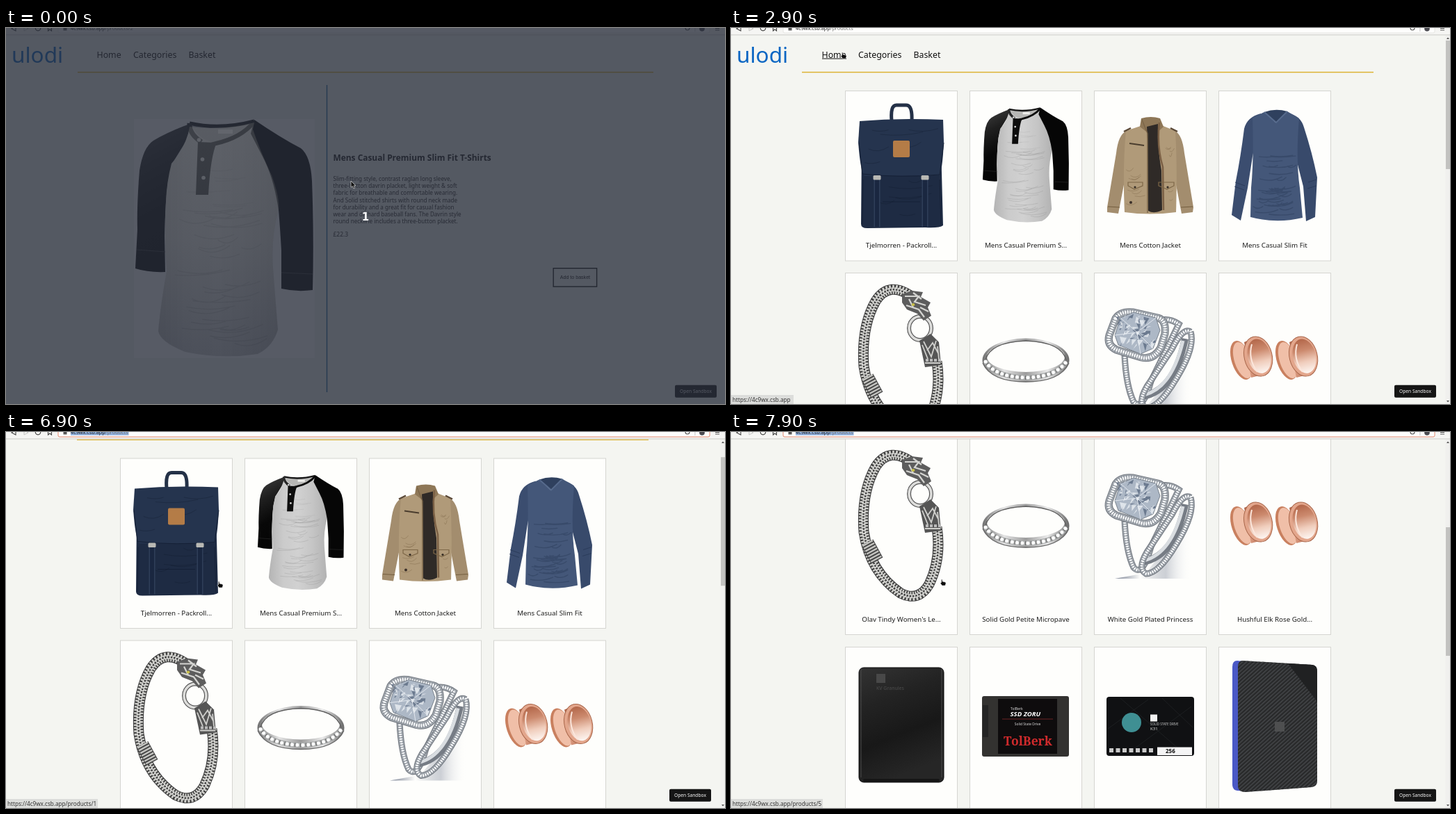
An HTML page for the animation above (8 s loop, 1034x541 px).

```html
<!DOCTYPE html>
<html lang="en">
<head>
<meta charset="utf-8">
<title>Shop demo</title>
<style>
  html, body { margin: 0; width: 100%; height: 100%; overflow: hidden; background: #f4f5f1; }
  svg { display: block; width: 100vw; height: 100vh; font-family: "Noto Sans", sans-serif; }
  text { white-space: pre; }
</style>
</head>
<body>
<svg id="stage" viewBox="0 0 1034 541"></svg>
<script>
const LOOP = 8000, TICK = 100;

let seed = 7;
const random = () => (seed = (seed * 16807) % 2147483647) / 2147483647;

// ---- markup helpers ----
const fill = (d, color, more = '') => `<path d="${d}" fill="${color}" ${more}/>`;
const line = (d, width, color, more = '') =>
  `<path d="${d}" fill="none" stroke="${color}" stroke-width="${width}" ${more}/>`;
const rect = (x, y, w, h, color, more = '') =>
  `<rect x="${x}" y="${y}" width="${w}" height="${h}" fill="${color}" ${more}/>`;
const oval = (x, y, rx, ry, color, more = '') =>
  `<ellipse cx="${x}" cy="${y}" rx="${rx}" ry="${ry}" fill="${color}" ${more}/>`;
const text = (x, y, size, content, color = '#111', more = '') =>
  `<text x="${x}" y="${y}" font-size="${size}" fill="${color}" ${more}>${content}</text>`;
const middle = 'text-anchor="middle"';
const gradient = (id, x2, y2, colors) =>
  `<linearGradient id="${id}" x2="${x2}" y2="${y2}">${colors.map((c, i) =>
    `<stop offset="${i / (colors.length - 1)}" stop-color="${c}"/>`).join('')}</linearGradient>`;

function creases(x, y, w, h, count, color, width = 1) {
  let d = '';
  for (let i = 0; i < count; i++) {
    const len = w * (.2 + .4 * random()), x0 = x + (w - len) * random(), y0 = y + h * random();
    d += `M${x0} ${y0}q${len / 2} ${h * .05 * (random() + .3)} ${len} ${-h * .04 * random()}`;
  }
  return line(d, width, color, 'opacity=".3" stroke-linecap="round"');
}

// small random triangles inside a box
function shards(x, y, w, h, count, color) {
  let d = '';
  for (let i = 0; i < count; i++) {
    d += `M${x + w * random()} ${y + h * random()}l${10 * random()} ${9 * random() - 6}l${-8 * random()} ${10 * random()}Z`;
  }
  return fill(d, color, 'opacity=".7"');
}

const pave = (d, width, gap = 3.4) =>
  line(d, width, '#70767e') + line(d, width - 2, '#a4aab1') +
  line(d, width * .45, '#f3f5f7', `stroke-linecap="round" stroke-dasharray="0 ${gap}"`) +
  line(d, width * .6, '#666d76', `stroke-dasharray=".8 ${gap - .8}" stroke-dashoffset="${gap / 2}"`);

// ---- products ----
const torso = 'M264 142L262 152Q254 178 238 195Q231 222 230 250Q227 300 231 350Q222 400 219 436' +
  'Q222 452 258 466Q310 477 362 469Q384 458 391 434Q387 385 384 345Q381 300 392 262' +
  'Q394 245 382 212Q366 178 355 146L357 136Q310 148 264 142Z';

const raglan = () =>
  fill('M264 138Q232 150 212 162Q197 172 192 205Q188 255 189 290L186 346Q205 352 229 351L228 300Q229 250 233 222L239 195L263 156Z', 'url(#sleeve)') +
  fill(torso, 'url(#heather)') +
  creases(236, 260, 140, 195, 34, '#777', 1.4) +
  creases(250, 190, 110, 70, 7, '#999', 1.2) +
  fill('M357 132Q395 158 424 173Q438 184 440 220Q443 300 441 377Q418 380 396 375L396 320Q394 285 392 262Q385 215 369 185L352 152Z', '#060606') +
  fill('M266 138Q310 150 354 136Q335 158 302 166Q275 160 266 138', '#b7b7b5') +
  rect(305, 146, 21, 6, '#efefec') +
  line('M264 137Q308 147 357 134', 5, '#161616') +
  line('M357 135Q338 158 302 166Q290 168 284 178', 6, '#0a0a0a') +
  line('M264 137Q263 152 281 164', 7, '#262626') +
  fill('M276 164L303 165Q294 185 291 240L273 240Z', '#0d0d0d') +
  [[277.5, 161], [282.5, 189], [284, 215.5]].map(([x, y]) => oval(x, y, 2.8, 2.8, '#d9d9d9')).join('') +
  line('M188 319L229 322M396 352L441 354', .9, '#3a3a3a');

const backpack = () =>
  line('M231 133Q229 111 238 111L252 111Q261 111 260 133', 5, '#243147') +
  fill('M188 170L302 170L305 284Q300 288 280 287L196 288Q187 288 187 282Z', '#1e2b43') +
  fill('M185 134Q245 129 305 132L306 164Q304 208 299 212L192 213Q186 206 183 164Z', '#25344e') +
  line('M184 165L189 210Q245 216 300 211L306 165', 1, '#152036') +
  line('M190 218L189 283M300 218L302 283M218 250H272', 1, '#152036') +
  creases(192, 136, 106, 140, 12, '#0f1828') +
  rect(233, 162, 24, 24, '#b47c47', 'rx="2"') +
  line('M210 216V286M279 216V286', 9, '#2f3f59') +
  line('M210 216V286M279 216V286', 6, '#1a2740') +
  rect(204.5, 212, 11, 6.5, '#b9b9b4', 'rx="1.5"') + rect(273.5, 212, 11, 6.5, '#b9b9b4', 'rx="1.5"');

const jacket = () =>
  fill('M569 148Q557 153 554 180L541 258L541 265L557 267L568 210Z', '#a38d6e') +
  fill('M638 148Q649 153 652 180L665 258L664 265L648 267L637 210Z', '#a38d6e') +
  fill('M589 141L568 148Q563 200 566 265Q602 270 640 265Q642 200 639 148L619 140Z', '#b09a79') +
  fill('M588 142L590 130Q604 126 617 130L622 142Q608 156 601 152Z', '#8e7757') +
  fill('M598 142L614 138Q613 170 619 205L620 262Q608 268 600 263L599 160Z', '#2f2a27') +
  line('M616 136Q612 170 621 200L622 262', 2.5, '#7b6045') +
  line('M591 132L599 152V266', 1.3, '#796447') +
  line('M571 227L580 232L592 227V222H571ZM615 227L627 232L637 227V222H615Z', 1.2, '#7d6747') +
  line('M573 166L594 169', 1.8, '#4a3d2e') +
  line('M542 257L559 258M647 258L664 257', 1, '#735d3e') +
  line('M565 149L575 144M632 144L642 149', 2.5, '#5a4836') +
  oval(581, 229, 1.6, 1.6, '#332a22') + oval(628, 229, 1.6, 1.6, '#332a22') + oval(575, 251, 2, 2, '#3b3029') +
  creases(567, 175, 29, 85, 8, '#6a5535') + creases(625, 160, 13, 100, 6, '#6a5535');

const pullover = () =>
  fill('M762 123Q742 128 738 145Q733 185 726 220L720 269L733 277L743 230L750 185Z', '#3b4d6f') +
  fill('M804 123Q820 128 824 143Q836 180 843 215L840 272L827 278L823 228L812 185Z', '#384a6b') +
  fill('M767 121L750 129Q752 190 748 230L747 272Q784 282 822 273L818 230Q812 190 817 130L800 120L783 136Z', '#445779') +
  fill('M767 121Q783 115 800 120L784 136Z', '#2f405e') +
  line('M767 121L784 136L800 120', 2, '#566a8c') +
  creases(751, 180, 62, 92, 34, '#1d2b47', 1.3) +
  line('M725 222L739 227M724 228L738 233M830 222L842 218M829 231L842 227', .9, '#2a3a59');

function bracelet() {
  const chain = 'M262 388Q228 362 208 393Q187 430 191 487Q200 545 244 575Q270 588 285 562Q303 525 296 480';
  const clasp = 'M196 502L210 528';
  return line(chain, 15, '#3c3c3c') +
    line(chain, 13, '#cfcfcb', 'stroke-dasharray="2.4 1.9"') +
    line(chain, 2, '#3a3a3a') +
    line(chain, 6, '#e8e8e5', 'stroke-dasharray="1.6 2.700" stroke-dashoffset="2"') +
    line(clasp, 19, '#444') + line(clasp, 17, '#c4c4c0', 'stroke-dasharray="2.4 1.9"') +
    oval(272, 432, 16, 17, 'none', 'stroke="#555" stroke-width="6"') +
    oval(272, 432, 16, 17, 'none', 'stroke="#dcdcda" stroke-width="3.600"') +
    fill('M271 450L287 440L299 452L302 485L279 488Z', '#555') +
    line('M277 451L288 473L295 450M279 482H301M282 464L290 453L298 468M275 456L283 476M297 458L299 476', 1.8, '#cfcfcc') +
    line('M280 478H302', 4, '#bbb', 'stroke-dasharray="4 2"') +
    fill('M246 383L260 378L276 380L273 387L287 395L283 402L288 414L277 421L268 411L253 405L246 395Z', '#5d5d5d') +
    line('M250 386L270 386L264 394L280 399M252 399L270 405L278 416M262 381L274 390M272 402L284 408M256 390L262 402', 2.2, '#d4d4d1') +
    oval(262, 398, 2.4, 2, '#c9c04a');
}

function micropave() {
  const front = 'M366 480Q380 502 424 503Q468 502 482 480';
  return fill('M361.5 478a62.5 31.5 0 1 0 125 0a62.5 31.5 0 1 0 -125 0ZM368 473a56 22 0 1 1 112 0a56 22 0 1 1 -112 0Z', 'url(#silver)', 'fill-rule="evenodd"') +
    line('M366 478Q372 452 424 450Q476 452 482 478', 1.4, '#5f5f5f') +
    line(front, 7, '#adafaf') +
    line(front, 5, '#fff', 'stroke-linecap="round" stroke-dasharray="0 7.5"') +
    line(front, 6, '#666', 'stroke-dasharray="1 6.5" stroke-dashoffset="3.7"') +
    line('M362 482Q374 509 424 509Q474 509 486 482', 1.3, '#6a6a6a');
}

const solitaire = () =>
  fill('M596 546L634 500L662 462V554H552Z', 'url(#shade)') +
  pave('M566 470Q568 515 579 538Q592 552 604 508L644 426Q632 418 620 420', 9) +
  line('M592 530Q638 522 653 447', 10, '#767c85') + line('M594 528Q634 518 650 450', 5, '#d9dde1') +
  pave('M661 437Q650 430 634 462L598 516Q584 540 597 547Q616 546 640 505Q668 460 661 437', 9) +
  pave('M553 418Q560 407 578 409L614 417Q626 420 624 440L618 460Q608 478 590 474L554 463Q540 456 544 442Z', 11) +
  fill('M560 417L579 409L611 417L617 435L607 461L589 469L557 456L552 442Z', '#adb8c6', 'stroke="#79828d" stroke-width="1"') +
  shards(557, 415, 48, 42, 34, '#506078') +
  shards(557, 415, 48, 42, 34, '#f4f7fa') +
  line('M560 417L584 438L611 417M552 442L584 438L607 461M584 438L589 469', .8, '#eef2f6');

const tunnel = dx => `<g transform="translate(${dx} 0)">` +
  oval(734, 478, 14, 29, '#c9805f', 'transform="rotate(-18 734 478)"') +
  oval(736, 478, 12, 27, '#f0bfa8', 'transform="rotate(-18 736 478)"') +
  fill('M738 452L752 446L768 498L748 503Z', 'url(#rose)') +
  oval(758, 472.5, 20, 29, '#e3a68c', 'transform="rotate(-14 758 472)" stroke="#a9674b" stroke-width="1"') +
  oval(759.5, 472, 16.5, 25, 'url(#hollow)', 'transform="rotate(-14 760 472)"') +
  line('M749 455Q743 476 757 495', 2, '#fbe6dc') + '</g>';
const earrings = () => tunnel(0) + tunnel(65);

const portable = () =>
  rect(184, 682, 122, 165, 'url(#case)', 'rx="7" stroke="#0c0c0c"') +
  line('M187 684V840M303 684V840', 1, '#4a4a4a') +
  rect(209, 691, 13, 13, '#484848') +
  text(209, 713.5, 7, 'KV Granules', '#4d4d4d') +
  line('M192 844H298', 4, '#161616', 'stroke-linecap="round"');

const drive = () =>
  rect(361, 723, 125, 87, '#333230', 'rx="3"') + rect(362, 736, 8, 46, '#242424') +
  rect(384, 727, 85, 79, '#0e0c0d') +
  text(402, 743, 5, 'TolBerk', '#ddd') +
  text(401.5, 752, 9.6, 'SSD ZORU', '#fff', 'font-weight="700" font-style="italic"') +
  line('M390 756H463', .6, '#a33') +
  text(426.5, 765, 4.9, 'Solid State Drive', '#ddd', middle) +
  text(427, 794, 17.5, 'TolBerk', '#cf2a2c', middle + ' font-weight="700" style="font-family:\'Noto Serif\',serif"');

const flash = () =>
  rect(540, 724, 126, 85, '#101113', 'rx="4"') +
  line('M542 770L600 728M570 806L662 738M560 726L652 806M620 726L664 768', .6, '#25292b') +
  oval(576, 761, 14, 14, '#3f8f93') +
  rect(603, 749.5, 10, 10, '#f2f2f2') +
  text(603, 764.5, 4.5, 'SOLID STATE DRIVE', '#ccc') +
  text(603, 772, 6, 'K31', '#ddd') +
  [0, 1, 2, 3, 4, 5, 6].map(i => rect(544 + i * 9.5, 798, 6, 6, '#c9c9c9')).join('') +
  rect(613, 796.5, 50, 11.5, '#f5f5f5') + text(625, 805, 8, '256', '#111', 'font-weight="700"');

function gaming() {
  const lid = 'M736 672L836 678Q843 679 843 687V845Q843 853 835 854L740 861Q729 861 729 852V681Q729 672 736 672Z';
  return fill('M728 672L745 674V860L728 859Q721 858 721 850V681Q721 672 728 672Z', '#4a58c6') +
    fill(lid, '#28292a') + fill(lid, 'url(#carbon)') +
    fill('M801 676L836 678Q843 679 843 687V731Z', '#202122') +
    rect(782, 760, 14, 14, '#4e4f50');
}

// ---- shop grid ----
const columns = [164.5, 343.5, 522.5, 701.5];
const rows = [[90.5, 244.5], [352.5, 282], [652.5, 258]];
const captions = [
  'Tjelmorren - Packroll...', 'Mens Casual Premium S...', 'Mens Cotton Jacket', 'Mens Casual Slim Fit',
  "Olav Tindy Women's Le...", 'Solid Gold Petite Micropave', 'White Gold Plated Princess', 'Hushful Elk Rose Gold...',
  'KV 2TB Granules P...', 'TolBerk SSD ZORU 1TB...', 'Morlan Quill 256GB S...', 'KV 4TB Gaming Drive W...'
];
const card = (caption, i) => {
  const x = columns[i % 4], [y, h] = rows[i >> 2];
  return rect(x, y, 161, h, '#fefefc', 'stroke="#d5d5d1"') +
    text(x + 80.5, y + h - 19, 9.75, caption, '#1c1c1c', middle);
};
const shirt = raglan();
const smallShirt = `<g transform="translate(271.8 50.5) scale(.4846)">${shirt}</g>`;
const grid = captions.map(card).join('') + backpack() + smallShirt + jacket() + pullover() +
  bracelet() + micropave() + solitaire() + earrings() + portable() + drive() + flash() + gaming();

// ---- product page ----
const description = [
  'Slim-fitting style, contrast raglan long sleeve,', 'three-button davrin placket, light weight &amp; soft',
  'fabric for breathable and comfortable wearing.', 'And Solid stitched shirts with round neck made',
  'for durability and a great fit for casual fashion', 'wear and diehard baseball fans. The Davrin style',
  'round neckline includes a three-button placket.'
];
const detail = rect(184, 131, 260, 344, '#fefefe') + shirt +
  rect(460.8, 82, 1.4, 442, '#1d6ba3') +
  text(470.5, 191.2, 11.93, 'Mens Casual Premium Slim Fit T-Shirts', '#151515', 'font-weight="700"') +
  description.map((s, i) => text(470.5, 219.8 + i * 10.25, 8.11, s, '#222')).join('') +
  text(470.5, 300, 8.5, '£22.3', '#222') +
  rect(787.2, 345.7, 62.4, 26.4, 'none', 'stroke="#111" stroke-width="1.4"') +
  text(818.4, 361.2, 7.1, 'Add to basket', '#111', middle + ' style="font-family:\'Liberation Sans\',sans-serif"');

const arrow = 'M0 0V9.5L2.3 7.5L4 11L5.7 10.2L4.2 6.9H7Z';

const toolbar = rect(0, 0, 1034, 10, '#f5f5f3') + rect(0, 9.3, 1034, 1.2, '#d3d3d0') +
  rect(75, -12, 937, 19, '#fdfdfc', 'id="field" rx="2"') +
  line('M14 -3L8 1L14 4Z', 1.1, '#444') + line('M26 -3L32 1L26 4Z', 1, '#c4c4c2') +
  line('M42.5 -1A3.7 3.7 0 1 0 49.5 -1M60.5 -3V4L63 2L65.5 4V-3', 1.1, '#444') +
  rect(82.5, -1, 5, 4.5, '#555') +
  rect(93, 0, 0, 4.7, '#8fb0de', 'id="selection"') +
  text(93, 3, 7.28, '4c9wx.csb.app<tspan id="path" fill="#777"></tspan>', '#222') +
  line('M977 0Q977 3 980 3Q983 3 983 0', 1.1, '#555') + rect(990.5, 0, .8, 5, '#bbb') +
  oval(1001, 1, 3.8, 3.8, '#4a4a50') + line('M1020 .5H1026M1020 3H1026', 1, '#555');

document.getElementById('stage').innerHTML = `<defs>
  ${gradient('sleeve', .2, 1, ['#424242', '#1f1f1f', '#080808', '#050505'])}
  ${gradient('heather', 1, 0, ['#b4b4b4', '#cbcbcb', '#d1d1d1', '#c5c5c5', '#b2b2b2'])}
  ${gradient('silver', 1, 0, ['#6f6f6f', '#e4e4e4', '#9c9c9c', '#eaeaea', '#686868'])}
  ${gradient('shade', 1, 0, ['#7d8596', '#68718400', '#9aa1af80', '#ffffff00'])}
  ${gradient('rose', 1, 1, ['#a85f45', '#e2a48a', '#b76e52'])}
  ${gradient('hollow', 0, 1, ['#b3674a', '#cc8a6e', '#f0cdbc', '#fdf6f2'])}
  ${gradient('case', .3, 1, ['#333', '#232323', '#181818', '#262626'])}
  ${gradient('glow', 0, 1, ['#a8a8a02e', '#a8a8a020', '#a8a8a000'])}
  <pattern id="carbon" width="4" height="4" patternUnits="userSpaceOnUse" patternTransform="rotate(-42)">
    <rect width="4" height="1.5" fill="#45474a"/></pattern>
  <clipPath id="view">${rect(0, 10, 1034, 531, '#000')}</clipPath>
</defs>
${rect(0, 0, 1034, 541, '#f4f5f1')}
<g clip-path="url(#view)"><g id="page">
  ${text(8, 49.5, 31.5, 'ulodi', '#0b66c3')}
  ${text(130.5, 42.5, 12.35, 'Home')}${text(183, 42.5, 12.35, 'Categories')}${text(262.5, 42.5, 12.35, 'Basket')}
  ${rect(131, 43.6, 35, 1, '#111', 'id="underline"')}
  ${rect(103, 62.9, 828, 1.5, '#dcb435', 'id="rule"')}
  <g id="detail">${detail}</g><g id="grid">${grid}</g>
</g></g>
<g id="scrollbar">${rect(1027.5, 10, 6.5, 531, '#f0f0ee')}${rect(1028, 18, 6, 185, '#c2c2c0', 'id="thumb"')}
  ${fill('M1029 16L1031 13.5L1033 16ZM1029 536L1031 538.5L1033 536Z', '#555')}</g>
${toolbar}
<g id="sandbox">${rect(962, 513.8, 60, 18, '#151515', 'rx="2"')}${text(992, 525.3, 6.64, 'Open Sandbox', '#fff', middle)}</g>
<g id="status">${rect(0, 528, 90, 13, '#dcdddb', 'id="statusBox"')}${text(2, 537.7, 8.15, '', '#333', 'id="statusText"')}</g>
<g id="cursor">
  ${fill(arrow, '#111', 'id="arrow" stroke="#fff" stroke-width=".7"')}
  ${line('M-1.5 -2.5H1.5M0 -2.5V7M-1.5 7H1.5', 1, '#333', 'id="beam"')}
  ${fill('M1.5 0Q2.8 -.5 3 1V3L7 4Q8.3 4.5 8 6L7 9H2.5L0 5.5L1.5 4.5Z', '#0c0c0c', 'id="hand" stroke="#fff" stroke-width=".5"')}
</g>
<g id="veil">${rect(0, 0, 1034, 541, '#282e3a', 'opacity=".78"')}${fill(torso, 'url(#glow)')}
  ${fill(arrow, '#111', 'transform="translate(496 220)" stroke="#ddd" stroke-width=".7"')}
  ${text(517, 276.5, 15, '1', '#fff', middle + ' font-weight="700" style="font-family:\'DejaVu Sans\',sans-serif"')}</g>`;

// ---- motion ----
const $ = id => document.getElementById(id);
const show = (id, on) => $(id).setAttribute('visibility', on ? 'inherit' : 'hidden');
const set = (id, name, value) => $(id).setAttribute(name, value);

// rows of [time, ...values]
const cursorPath = [
  [1300, 496, 220], [2200, 186, 53], [2300, 163, 45], [2400, 163, 45], [2600, 158, 35], [3200, 158, 35],
  [3900, 183, -14], [5600, 96, -14], [5700, 96, 21], [5900, 99, 28], [6100, 99, 28], [6700, 304, 215],
  [7300, 304, 215], [7900, 301, 212]
];
const scrollPath = [[6700, 0], [6900, 52.5], [7300, 156.3], [7900, 343]];
const selectionPath = [[4200, 0], [4700, 83.5]];
const cursorShapes = [[0, 'beam'], [1500, 'arrow'], [2300, 'hand'], [3400, 'arrow'], [6400, 'hand']];
const links = [[0, ''], [2500, ' '], [3500, ''], [6600, '/products/1'], [7400, '/products/5']];

const smooth = p => p * p * (3 - 2 * p);
function along(path, t, ease = p => p) {
  const next = path.findIndex(k => k[0] > t);
  if (next === 0) return path[0].slice(1);
  if (next < 0) return path[path.length - 1].slice(1);
  const a = path[next - 1], b = path[next], p = ease((t - a[0]) / (b[0] - a[0]));
  return a.slice(1).map((v, i) => v + (b[i + 1] - v) * p);
}
const latest = (steps, t) => steps.filter(s => s[0] <= t).pop()[1];

function draw(t) {
  const left = t >= 2700, listed = t >= 2800, [scroll] = along(scrollPath, t);
  show('veil', t < 500);
  show('detail', !left);
  show('grid', listed);
  show('scrollbar', listed);
  show('underline', t >= 2300 && t < 3400);
  set('rule', 'x', listed ? 102 : 103);
  set('rule', 'width', listed ? 822 : 828);
  set('page', 'transform', `translate(0 ${-scroll})`);
  set('thumb', 'y', 18 + scroll * .347);
  set('sandbox', 'transform', `translate(${listed ? -8 : 0} 0)`);

  $('path').textContent = left ? '/products' : '/products/2';
  set('field', 'stroke', t >= 4100 ? '#e58a70' : '#e6e6e3');
  const [selected] = along(selectionPath, t);
  set('selection', 'x', 176.5 - selected);
  set('selection', 'width', selected);

  const link = latest(links, t);
  show('status', link);
  $('statusText').textContent = 'https://4c9wx.csb.app' + link.trim();
  set('statusBox', 'width', link.length > 1 ? 132 : 90);

  const [x, y] = along(cursorPath, t, smooth), shape = latest(cursorShapes, t);
  show('cursor', t >= 500);
  set('cursor', 'transform', `translate(${x} ${y})`);
  for (const id of ['arrow', 'beam', 'hand']) show(id, id === shape);
}

const start = performance.now();
function frame() {
  const t = (performance.now() - start) % LOOP;
  draw(Math.floor(t / TICK) * TICK);
  requestAnimationFrame(frame);
}
frame();
</script>
</body>
</html>
```
